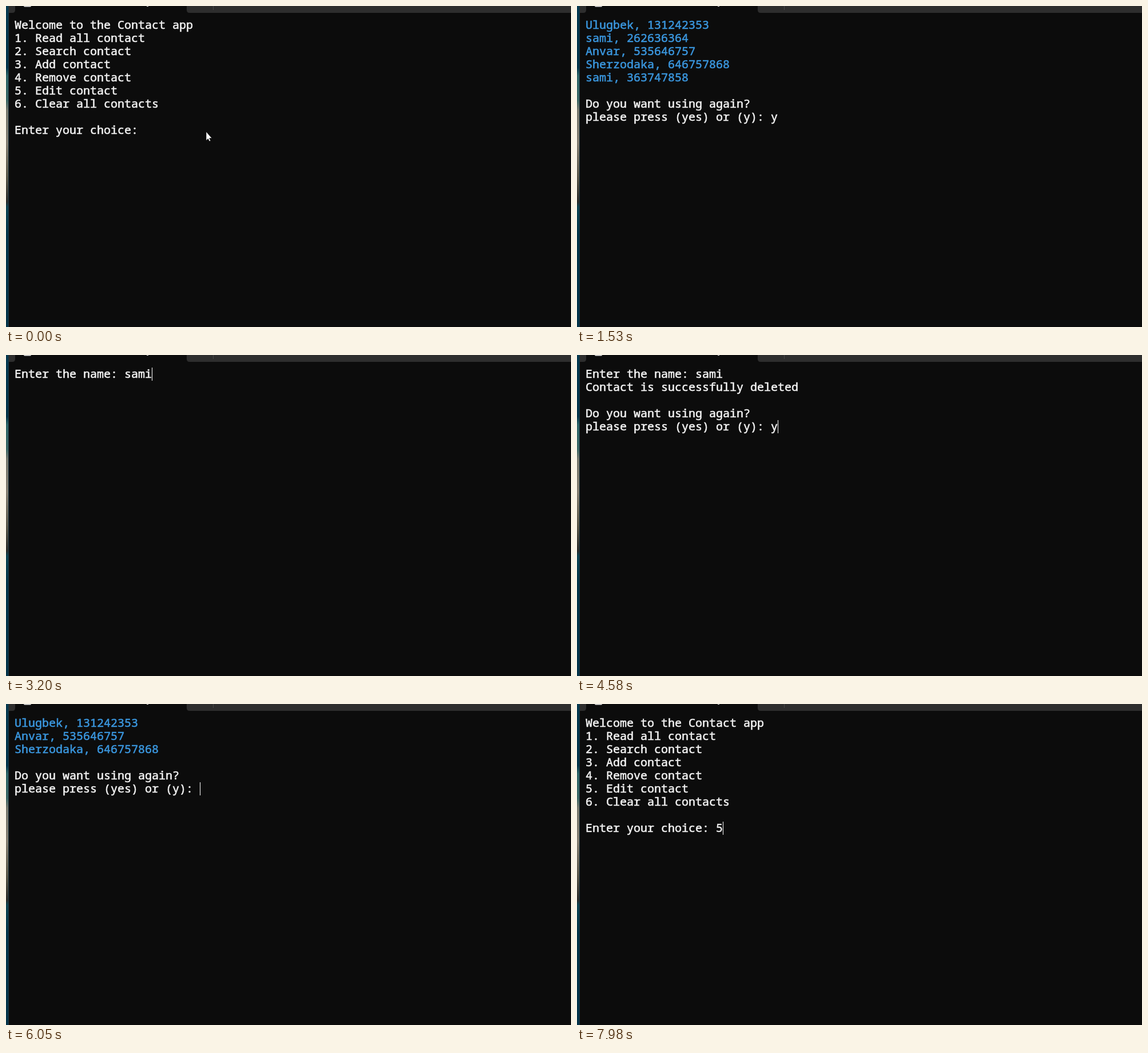
Recreate the animation shown at these times as an HTML page. Size 988 by 562 pixels, loop 8000 ms.

```html
<!DOCTYPE html>
<html lang="en">
<head>
<meta charset="utf-8">
<title>Contact app</title>
<style>
  html, body { margin: 0; width: 100%; height: 100%; overflow: hidden; background: #0c0c0c; }
  #stage { position: absolute; left: 0; top: 0; width: 988px; height: 562px; overflow: hidden; background: #0c0c0c; }
  #desktop {
    position: absolute; left: 0; top: 0; width: 4px; height: 562px; border-right: 1px solid #1d3640;
    background: linear-gradient(#063a50 0, #04344a 108px, #2f6668 122px, #3c6865 165px, #78796e 182px,
      #857f72 240px, #5b584a 300px, #2c2d2a 343px, #0d4452 352px, #043549 400px, #05344a 562px);
  }
  svg { position: absolute; left: 0; top: 0; }
  #text {
    position: absolute; left: 15px; top: 21px; margin: 0; color: #f2f2f2;
    font: 20px/23px "Noto Sans Mono", "DejaVu Sans Mono", monospace;
    -webkit-text-stroke: .6px; font-variant-ligatures: none;
  }
  .blue { color: #3a96dd; }
  #caret { position: absolute; width: 1px; height: 23px; background: #fff; }
</style>
</head>
<body>
<div id="stage">
  <div id="desktop"></div>
  <svg width="988" height="562" viewBox="0 0 988 562">
    <path fill="#2e2e2e" d="M5 0H16V7Q16 12 11 12H5ZM316 0H988V12H321Q316 12 316 7Z"/>
    <path fill="#484848" d="M362 0h1v7h-1z"/>
    <path fill="#e6e6e6" d="M31 0H44Q44 1.5 42 1.5H33Q31 1.5 31 0ZM246 0h3v1h-3z"/>
    <path id="pointer" fill="#fff" stroke="#000" stroke-width=".6"
      d="M350 220V235.5L353.4 232.4L355.6 237L357.8 236L355.7 231.5H360Z"/>
  </svg>
  <pre id="text"></pre>
  <div id="caret"></div>
</div>
<script>
const LOOP = 8000, CELL = 12, ROW = 23, LEFT = 15, TOP = 22;

const menu = ["Welcome to the Contact app", "1. Read all contact", "2. Search contact", "3. Add contact",
  "4. Remove contact", "5. Edit contact", "6. Clear all contacts", "", "Enter your choice: "];
const again = ["", "Do you want using again?", "please press (yes) or (y): "];
const people = ["Ulugbek, 131242353", "sami, 262636364", "Anvar, 535646757", "Sherzodaka, 646757868", "sami, 363747858"];
const ask = ["Enter the name: "];
const removed = ["Enter the name: sami", "Contact is successfully deleted", ...again];
const fullList = [...people, ...again];
const shortList = [...people.filter(p => !p.startsWith("sami")), ...again];

// start time, screen, typed text, caret opacity
const steps = [
  [0, menu, "", 0], [70, menu, "1", 1],
  [340, fullList, "", 1], [930, fullList, "", 0], [1330, fullList, "y", 1], [1530, fullList, "y", 0],
  [1600, menu, "", 1], [1930, menu, "4", 1],
  [2400, ask, "", 1], [2730, ask, "s", 1], [2800, ask, "sa", 1], [3000, ask, "sam", 1], [3200, ask, "sami", 1],
  [3790, removed, "", 1], [4580, removed, "y", 1], [4910, removed, "y", 0],
  [4980, menu, "", 0], [5170, menu, "", 1], [5700, menu, "1", 1],
  [6050, shortList, "", 1], [6380, shortList, "", .5], [6510, shortList, "", 0],
  [6910, shortList, "", .5], [7040, shortList, "", 1], [7110, shortList, "y", 1],
  [7450, menu, "", 1], [7910, menu, "", 0], [7980, menu, "5", 1]
];

const [text, caret, pointer] = ["text", "caret", "pointer"].map(id => document.getElementById(id));
let shown;

function show(step) {
  const [start, lines, typed, opacity] = step;
  const last = lines.length - 1;
  text.innerHTML = lines.map(line => people.includes(line) ? `<span class="blue">${line}</span>` : line).join("\n") + typed;
  caret.style.left = LEFT + (lines[last].length + typed.length) * CELL + "px";
  caret.style.top = TOP + last * ROW + "px";
  caret.style.opacity = opacity;
  pointer.style.display = start === 0 ? "" : "none";
}

function tick() {
  const time = performance.now() % LOOP;
  const step = steps.findLast(s => s[0] <= time);
  if (step !== shown) show(shown = step);
  requestAnimationFrame(tick);
}
tick();
</script>
</body>
</html>
```
